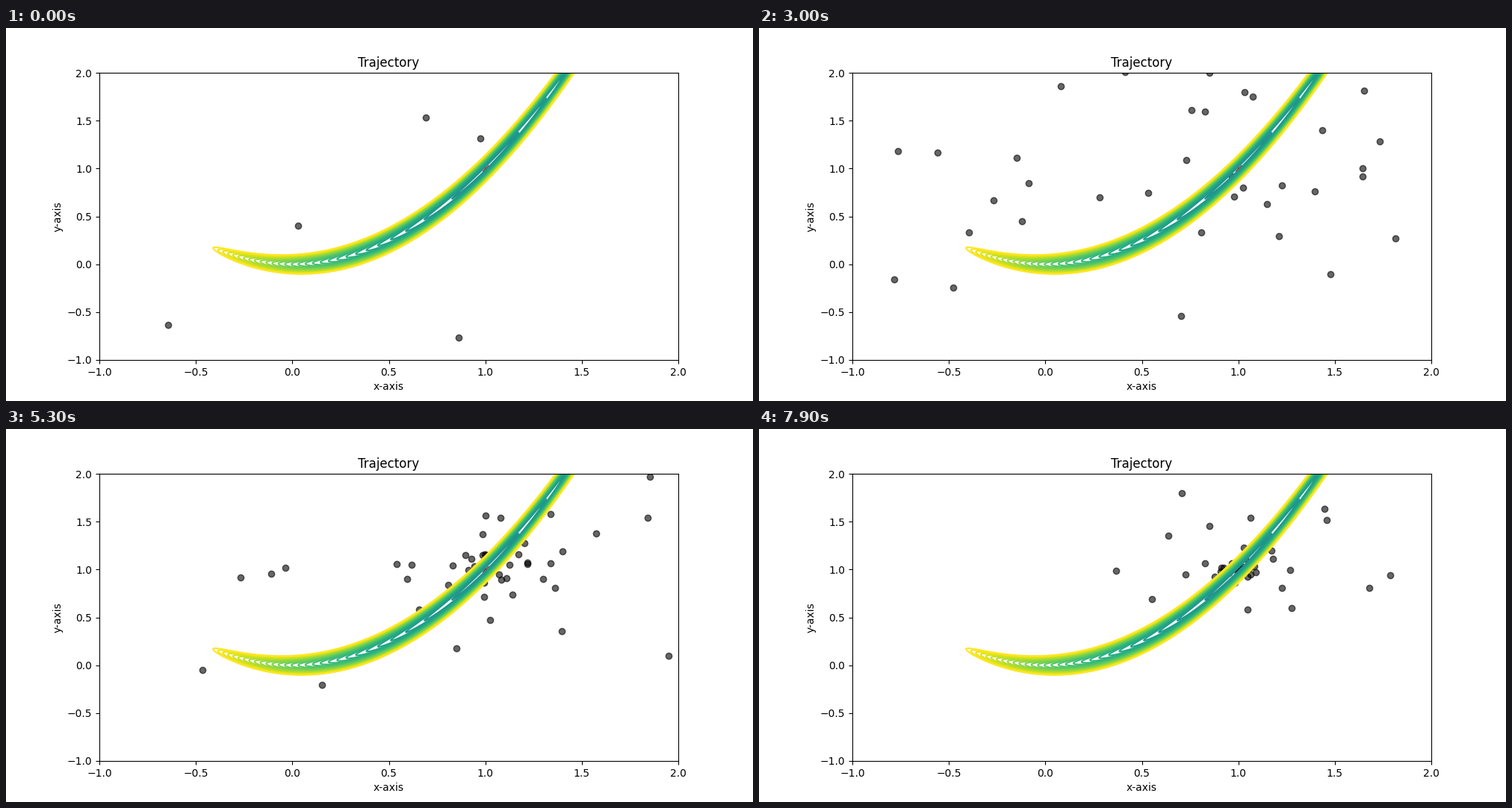
A matplotlib script that plays this animation: 1000x500 px, repeating every 8000 ms.

```python
import numpy as np
import matplotlib.pyplot as plt
from matplotlib.animation import FuncAnimation

FRAMES, STEP_MS = 80, 100
COUNT = 50
BEST = np.array([1.0, 1.0])
START = np.array([(0.69, 1.53), (0.975, 1.315), (0.03, 0.40),
                  (-0.645, -0.635), (0.86, -0.77)])
rng = np.random.default_rng(12)


def swing():
    """Particles oscillate around the optimum, each settling at its own pace."""
    t = np.arange(FRAMES)[:, None, None]
    turn = rng.uniform(0.3, 0.95, (FRAMES, COUNT, 2)).cumsum(axis=0)
    a, b = rng.normal(size=(2, 1, COUNT, 2))
    settle = 15 + 30 * rng.permutation(np.linspace(0, 1, COUNT)) ** 2
    reach = 3.3 * np.exp(-t / settle[:, None])
    drift = np.exp(-((t - 36) / 8) ** 2) * np.array([-0.3, -0.12])
    return BEST + drift + reach * (a * np.cos(turn) + b * np.sin(turn))


def opening(pose):
    """First pose: a few particles in view, all others outside the axes."""
    pose = pose.copy()
    off = pose - BEST
    size = np.abs(off).max(axis=1, keepdims=True)
    seen = (np.abs(pose - 0.5) < 1.6).all(axis=1)
    pose[seen] = (BEST + off / size * 2.6)[seen]
    pose[:len(START)] = START
    return pose


paths = swing()
fade = np.clip(1 - np.arange(FRAMES) / 8, 0, 1)[:, None, None]
paths = paths + fade * (opening(paths[0]) - paths[0])

fig, ax = plt.subplots(figsize=(10, 5), dpi=100)
ax.set_title("Trajectory")
ax.set_xlabel("x-axis")
ax.set_ylabel("y-axis")

x, y = np.meshgrid(np.linspace(-0.5, 1.5, 1001), np.linspace(-0.2, 2, 1101))
cost = (1 - x) ** 2 + 100 * (y - x ** 2) ** 2
ax.contour(x, y, cost, levels=np.arange(-2, 2, 0.07))
ax.scatter(*BEST, color="red", marker="x")
dots = ax.scatter(*paths[0].T, c="black", alpha=0.6)
ax.set_xlim(-1, 2)
ax.set_ylim(-1, 2)


def draw(f):
    dots.set_offsets(paths[f])
    return (dots,)


anim = FuncAnimation(fig, draw, frames=FRAMES, interval=STEP_MS,
                     repeat=True, repeat_delay=0)
plt.show()
```
